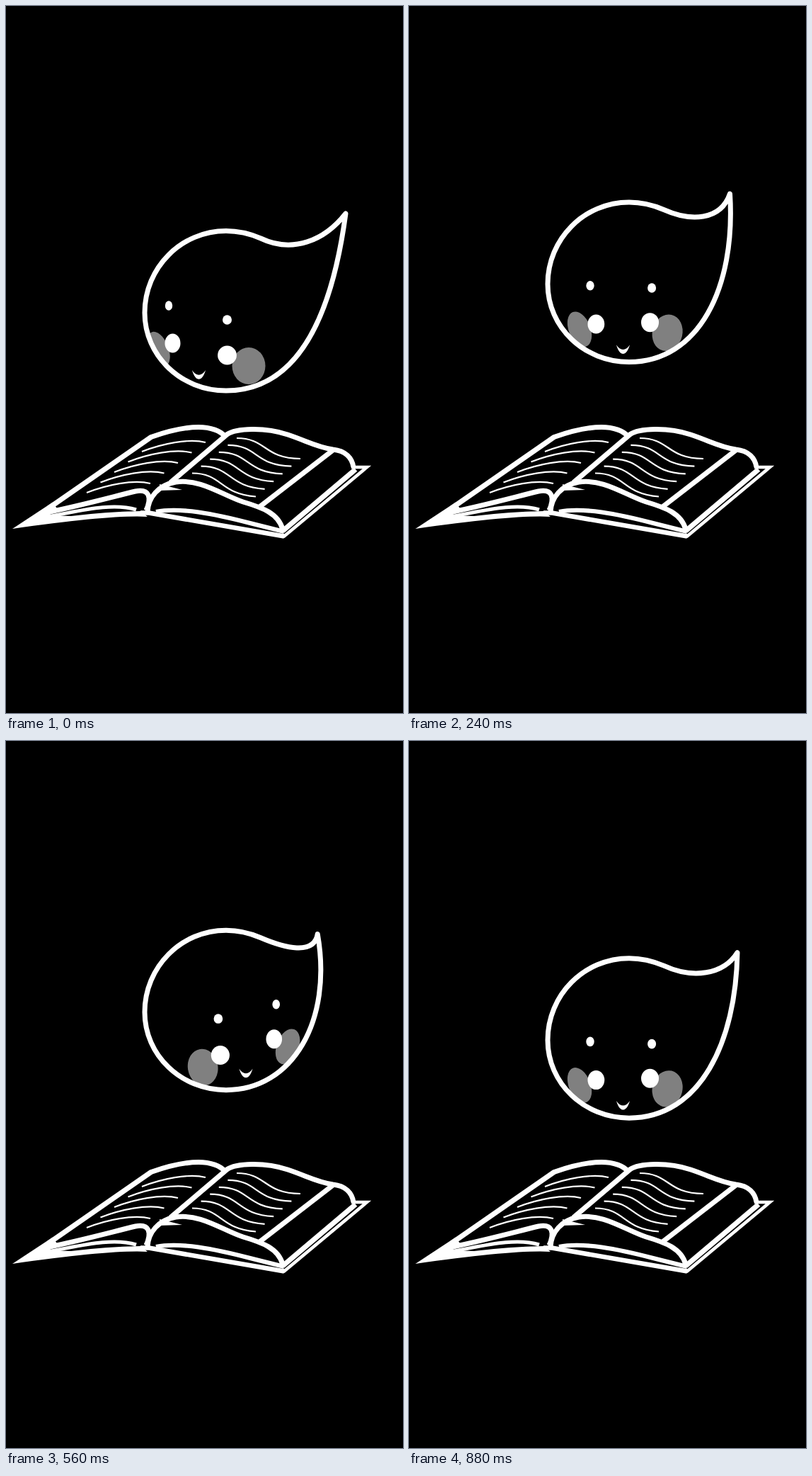
Animation, 561 px wide and 998 px high, one loop 960 ms. Source, as an HTML page:

```html
<!DOCTYPE html>
<html lang="en">
<head>
<meta charset="utf-8">
<title>Reading drop</title>
<style>
html, body { margin: 0; height: 100%; overflow: hidden; background: #000; }
svg { display: block; width: 100vw; height: 100vh; }
.line { fill: none; stroke: #fff; stroke-width: 7; }
</style>
</head>
<body>
<svg viewBox="0 0 561 998" fill="#fff">
  <defs><clipPath id="clip"><path id="clipShape"/></clipPath></defs>

  <g id="drop">
    <g clip-path="url(#clip)" fill="#808080">
      <ellipse id="cheekL" ry="26"/>
      <ellipse id="cheekR" ry="26"/>
    </g>
    <path id="outline" class="line" stroke-linejoin="round"/>
    <ellipse id="browL" ry="6.8"/>
    <ellipse id="browR" ry="6.8"/>
    <ellipse id="eyeL" ry="13.5"/>
    <ellipse id="eyeR" ry="13.5"/>
    <path id="mouth" d="M-9.5-6C-4 3 4 3 9.5-6C5 11-5 11-9.5-6Z"/>
  </g>

  <g id="book">
    <path d="M9 738L66 700.5L74 712L60 719L92 720Q140 714 190 713L200 721Q150 718 9 738Z"/>
    <g class="line">
      <path d="M60 709L205 608.5C235 598 255 594.5 272 594.5C290 594.5 303 600 309 607"/>
      <path d="M232 673L312 605C325 596 365 594 398 605C425 614 440 623 462 626C480 628 489 638 491 651"/>
      <path d="M62 714C110 704 150 693 183 685C203 681 206 694 198 712"/>
      <path d="M200 714C201 694 215 676 240 672C275 667 305 690 335 700C362 708 385 716 391 739"/>
      <path d="M357 708L462 627M391 741L494 654"/>
      <path d="M50 722C90 717 145 699 184 711" stroke-width="5"/>
      <path d="M190 715.5L202 715.5L393 748.5" stroke-width="6.5"/>
      <path d="M212 714C245 707 295 717 345 730L393 742" stroke-width="6"/>
      <path d="M388 747.5L393 748.5L510 651L488 651" stroke-width="4.5"/>
    </g>
    <path d="M217 675L249 683L217 684Z"/>
    <g id="text" class="line" style="stroke-width:2.2"/>
  </g>
</svg>
<script>
const $ = id => document.getElementById(id);
const set = (id, attrs) => {
  for (const name in attrs) $(id).setAttribute(name, attrs[name]);
};

// Lines of writing, stepping down each page
let rows = '';
for (let i = 0; i < 5; i++) {
  const x = 192 - 19.5 * i, y = 629 + 14.5 * i;
  rows += `<path d="M${x} ${y}c28-11 66-19 90-13"/>`;
}
for (let i = 0; i < 6; i++) {
  const x = 326 - 12.6 * i, y = 610 + 9.9 * i;
  rows += `<path d="M${x} ${y}c43 0 38 29 90 ${29 + i * 0.8}"/>`;
}
$('text').innerHTML = rows;

const STEP = 80, STEPS = 12;

// Keyframes: [step, ...values], linear in between
const liftKeys = [[0, 317.5], [3, 277], [5, 247.5], [12, 316.5]];
const tipKeys = [[0, 480, -24.5], [1, 480, -24], [3, 453.5, -12], [5, 444.5, 15],
  [9, 436, -4.5], [11, 464, -8], [12, 480, -24.5]];

function track(keys, step) {
  const i = keys.findIndex(key => key[0] > step);
  const from = keys[i - 1], to = keys[i];
  const f = (step - from[0]) / (to[0] - from[0]);
  return from.map((v, n) => v + (to[n] - v) * f).slice(1);
}

// Where each feature sits with the head turned left, ahead and right
const features = {
  browL: [[230, 105.5], [266, 120.5], [312.5, 125]],
  browR: [[312.5, 125.5], [353, 118], [391, 98.5]],
  eyeL: [[235.5, 158.5], [274, 174.5], [312.5, 175]],
  eyeR: [[312.5, 175.5], [350, 166.5], [388.5, 148]],
  cheekL: [[215.5, 167], [250, 183], [288, 196.5]],
  cheekR: [[343, 190.5], [373, 180.5], [407, 157]],
  mouth: [[272.5, 202.5], [312, 207], [347.5, 197.5]]
};

// Parabola through three points at q = 0, 0.5 and 1
function place(name, q) {
  const [a, m, b] = features[name];
  return [0, 1].map(n =>
    a[n] * (1 - q) * (1 - 2 * q) + 4 * m[n] * q * (1 - q) + b[n] * q * (2 * q - 1));
}

function outline([x, y]) {
  const reach = (x - 436) / 44;
  return `M311 0C330 0 345 4 360 10.5` +
    `C${392 + 13 * reach} ${24 + 8 * reach} ${x - 2 - 28 * reach} ${36 - 16 * reach + y / 4} ${x} ${y}` +
    `C462 ${130 - 20 * reach} ${403 + 14 * reach} 225.5 311 225.5` +
    `C247.5 225.5 196 176.5 196 115.5C196 52 247.5 0 311 0Z`;
}

function draw(step) {
  set('drop', { transform: `translate(0 ${track(liftKeys, step)})` });
  const d = outline(track(tipKeys, step));
  set('outline', { d });
  set('clipShape', { d });

  // Slow turn to the right, short hold, quick turn back
  const turn = step < 9 ? Math.min(step / 8, 1) : 1 - (step - 9) * 2.5 / 8;
  const oval = (id, rx, tilt = 0) => {
    const [x, y] = place(id, turn);
    set(id, { rx, transform: `translate(${x} ${y}) rotate(${tilt})` });
  };
  oval('browL', 5.2 + 1.3 * turn);
  oval('browR', 6.5 - 1.3 * turn);
  oval('eyeL', 11 + 2.4 * turn);
  oval('eyeR', 13.4 - 2.4 * turn);
  oval('cheekL', 14 + 9.5 * turn ** 2, -22 * (1 - turn ** 4));
  oval('cheekR', 23.5 - 9.5 * turn ** 1.5, 22 * turn ** 0.5);
  set('mouth', { transform: `translate(${place('mouth', turn).join(' ')})` });
}

const start = performance.now();
function tick() {
  draw(Math.floor((performance.now() - start) / STEP) % STEPS);
  requestAnimationFrame(tick);
}
tick();
</script>
</body>
</html>
```
